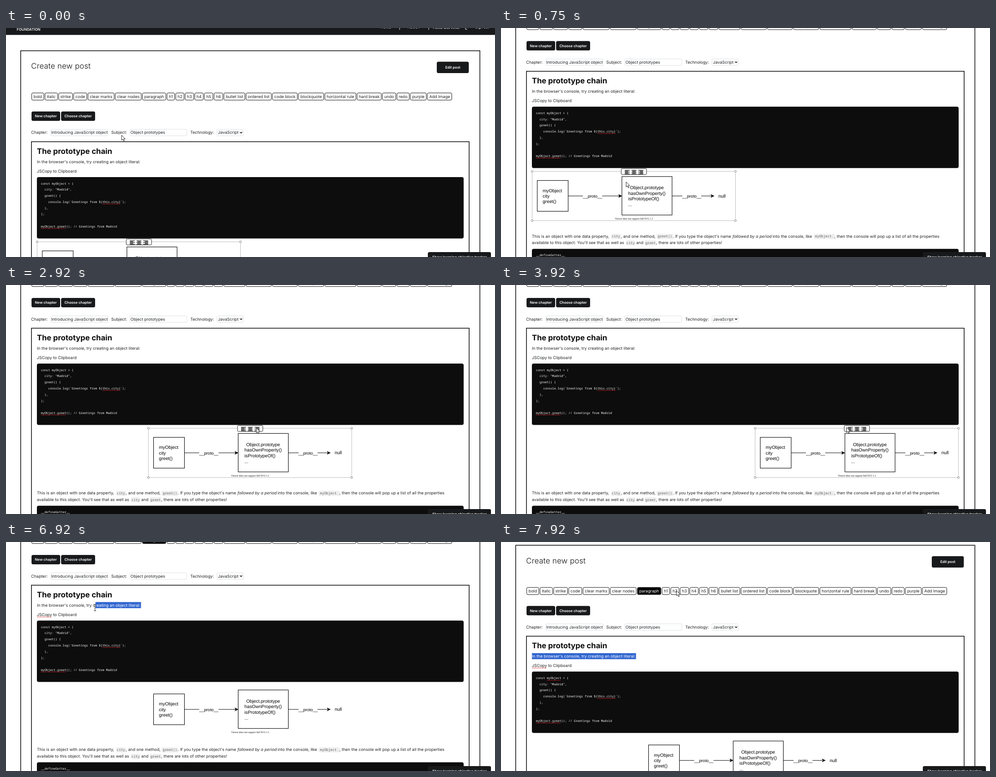
An HTML page that plays this animation: 1092 px wide and 513 px high, repeating every 8 s.

```html
<!DOCTYPE html>
<html lang="en">
<head>
<meta charset="utf-8">
<title>Post editor</title>
<style>
html, body { margin: 0; width: 100%; height: 100%; overflow: hidden; background: #fff; }
svg { display: block; width: 1092px; height: 513px; }
text { font: 9.1px Inter, sans-serif; fill: #212326; white-space: pre; text-rendering: geometricPrecision; }
.title { font-size: 17.06px; font-weight: 300; letter-spacing: .22px; fill: #111; }
.heading { font-size: 17.06px; font-weight: 700; fill: #0d0d0d; }
.strong { font-size: 7.96px; font-weight: 600; fill: #fff; }
.nav { fill: #fff; }
.small { font-size: 7.96px; fill: #fff; }
.code { font: 500 6.74px "Noto Sans Mono", monospace; fill: #fff; }
.inline { font: 7.66px "Noto Sans Mono", monospace; fill: #616161; }
.italic { font-style: italic; }
.figure { font: 10.3px "Liberation Sans", Arial, sans-serif; fill: #000; }
.proto { font: 9.5px "Liberation Sans", Arial, sans-serif; fill: #000; }
.caption { font: 5.65px "Liberation Serif", Times, serif; fill: #000; }
.mid { text-anchor: middle; }
.white { fill: #fff; }
.ink { fill: none; stroke: #000; }
</style>
</head>
<body>
<svg id="stage" viewBox="0 0 1092 513"></svg>
<script>
const DARK = '#18191b', BLOCK = '#0d0d0d';

const text = (x, y, str, cls = '') => `<text x="${x}" y="${y}" class="${cls}">${str}</text>`;
const box = (x, y, right, bottom, attrs = '') =>
  `<rect x="${x}" y="${y}" width="${right - x}" height="${bottom - y}" ${attrs}/>`;
const path = (d, attrs = 'class="ink"') => `<path d="${d}" ${attrs}/>`;

const darkButton = (x, y, right, bottom, label) =>
  box(x, y, right, bottom, `rx="3.5" fill="${DARK}"`) +
  text((x + right) / 2, (y + bottom) / 2 + 2.9, label, 'strong mid');

function squiggle(x, right, y, id = '') {
  let d = `M${x} ${y}`;
  for (let i = 1; x + i * 1.2 <= right; i++) d += `L${x + i * 1.2} ${y + (i % 2 ? 1.3 : 0)}`;
  return path(d, `id="${id}" fill="none" stroke="#e5242c" stroke-width=".8"`);
}

function navBar() {
  return box(0, -30, 1092, 15.5, `fill="${DARK}"`) +
    text(24, 6, 'FOUNDATION', 'strong') +
    text(836, 1, 'HOME', 'small') + text(897, 1, 'ABOUT', 'small') +
    text(953, 2, 'Hello Dorvino!', 'nav') + text(1048, 1, 'Sign out', 'small') +
    path('M879 -4V4M944 -4V4M1029 -4H1026V3H1030M1031 -1H1036', 'fill="none" stroke="#fff"');
}

function toolbar() {
  const buttons = [['bold', 84.5], ['italic', 115], ['strike', 148.5], ['code', 180.5],
    ['clear marks', 241.5], ['clear nodes', 302], ['paragraph', 357], ['h1', 376.5], ['h2', 397.5],
    ['h3', 419], ['h4', 440.5], ['h5', 462], ['h6', 484], ['bullet list', 533.5],
    ['ordered list', 592.5], ['code block', 650.5], ['blockquote', 709.5], ['horizontal rule', 781.5],
    ['hard break', 838], ['undo', 870.5], ['redo', 900.5], ['purple', 938.5], ['Add Image', 995.5]];
  let x = 57.5;
  return buttons.map(([label, right]) => {
    const markup = `<g id="${label.replace(' ', '-')}">` +
      box(x, 145.5, right, 161.5, 'rx="2.5" fill="#fff" stroke="#111"') +
      text((x + right) / 2, 157, label, 'mid') + '</g>';
    x = right + 2.7;
    return markup;
  }).join('');
}

function fields() {
  const border = 'rx="2" fill="#fff" stroke="#d5d9de" stroke-width=".8"';
  return text(56, 237.5, 'Chapter:') + box(100, 227, 228, 241.5, border) +
    text(101, 237.5, 'Introducing JavaScript object') +
    text(235, 237.5, 'Subject:') + box(276.5, 227, 404, 241.5, border) +
    text(278, 237.5, 'Object prototypes') +
    text(411.5, 237.5, 'Technology:') + box(471, 227, 530, 241.5, border) +
    text(473.5, 237.5, 'JavaScript') +
    path('M522.5 233L525 235.6L527.5 233', 'fill="none" stroke="#111" stroke-width="1.4"');
}

function codeBlock() {
  const lines = ['const myObject = {', '  city: "Madrid",', '  greet() {',
    '    console.log(`Greetings from ${this.city}`);', '  },', '};', '',
    'myObject.greet(); // Greetings from Madrid'];
  return box(69, 334, 1022, 471.5, `rx="4" fill="${BLOCK}"`) +
    lines.map((line, i) => text(78, 350.6 + i * 13.78, line, 'code')).join('') +
    squiggle(102, 134, 353, 'objectSquiggle') + squiggle(215, 256, 393.5) + squiggle(78, 134, 448.5);
}

function figure() {
  const head = x => path(`M${x} 533l-8.5 -4l2 4l-2 4z`, '');
  const icon = (x, align) => [0, 1, 2, 3, 4].map(i => {
    const width = i % 2 ? 7.5 : 11;
    return box(x + (11 - width) * align, 475 + i * 2, x + (11 - width) * align + width, 476.2 + i * 2);
  }).join('');
  const handle = (x, y) => `<circle cx="${x}" cy="${y}" r="2.1" fill="#fff" stroke="#777" stroke-width=".9"/>`;
  return box(12, 498.3, 81, 567.3, 'class="ink" stroke-width="1.1"') +
    box(201, 489.5, 313, 575.7, 'class="ink" stroke-width="1.1"') +
    ['myObject', 'city', 'greet()'].map((s, i) => text(24, 524.3 + i * 12.4, s, 'figure')).join('') +
    text(219, 518, 'Object.prototype', 'figure') +
    ['hasOwnProperty()', 'isPrototypeOf()', '...'].map((s, i) =>
      text(215, 530.3 + i * 12.6, s, 'figure')).join('') +
    path('M81 533H114M157 533H195M313 533H336M378 533H400') + head(201.5) + head(407.5) +
    text(135.5, 536.8, '__proto__', 'proto mid') + text(357, 536.8, '__proto__', 'proto mid') +
    text(416.5, 536.4, 'null', 'figure') +
    text(228, 586, 'Viewer does not support full SVG 1.1', 'caption mid') +
    '<g id="selected">' +
    box(0.5, 478, 454.5, 588.3, 'fill="none" stroke="#777" stroke-width=".8" stroke-dasharray="2 1.2"') +
    [0.5, 454.5].map(x => handle(x, 478) + handle(x, 588.3)).join('') +
    box(199.5, 471.6, 256, 485, 'rx="2" fill="#fff" stroke="#222"') +
    icon(207.5, 0) + icon(222.5, .5) + icon(237.5, 1) + '</g>';
}

function closing() {
  const inline = (x, right, y, str) =>
    box(x, y - 8.3, right, y + 3, 'rx="2" fill="#efefef"') + text((x + right) / 2, y - .3, str, 'inline mid');
  return text(69, 626.4, 'This is an object with one data property,') + inline(246, 267.5, 626.4, 'city') +
    text(267.5, 626.4, ', and one method,') + inline(347.5, 384.5, 626.4, 'greet()') +
    text(383.5, 626.4, '. If you type the object\'s name') +
    text(517, 626.4, 'followed by a period', 'italic') + text(606.5, 626.4, 'into the console, like') +
    inline(698.5, 745.5, 626.4, 'myObject.') +
    text(744.5, 626.4, ', then the console will pop up a list of all the properties') +
    text(69, 640.8, 'available to this object. You\'ll see that as well as') + inline(279, 300, 640.8, 'city') +
    text(302, 640.8, 'and') + inline(320.5, 347, 640.8, 'greet') +
    text(346.5, 640.8, ', there are lots of other properties!') +
    box(69, 651.5, 1022, 720, `rx="4" fill="${BLOCK}"`) + text(78, 668, '__defineGetter__', 'code');
}

const sentence = 'In the browser\'s console, try creating an object literal:';

document.getElementById('stage').innerHTML =
  '<clipPath id="selectionClip"><rect id="selection" y="292.6" height="13.6"/></clipPath>' +
  '<g id="page">' + navBar() +
  box(32.8, 51, 1058.3, 900, 'class="ink" stroke-width="1.5"') +
  text(56, 91.3, 'Create new post', 'title') +
  darkButton(962, 75.5, 1033.5, 101, 'Edit post') + toolbar() +
  darkButton(57, 187, 121, 208, 'New chapter') + darkButton(123, 187, 199, 208, 'Choose chapter') +
  fields() +
  box(56.8, 254.7, 1034.3, 900, 'class="ink" stroke-width="1.5"') +
  text(69, 282, 'The prototype chain', 'heading') +
  text(69, 303, sentence) +
  '<g clip-path="url(#selectionClip)">' + box(60, 290, 310, 310, 'fill="#3166d0"') +
  text(69, 303, sentence, 'white') + '</g>' +
  text(69, 323.8, 'JSCopy to Clipboard') + squiggle(69, 102, 325.5, 'copySquiggle') +
  box(160.3, 314.3, 161.2, 326.5, 'id="caret"') +
  codeBlock() + `<g id="figure">${figure()}</g><g id="closing">${closing()}</g></g>` +
  box(942, 502, 1083, 530, `rx="3.5" fill="${DARK}"`) +
  text(1012.8, 516, 'Show learning objective tracker', 'strong mid') +
  '<g id="pointer">' +
  path('M0 0V11.4L2.7 9L4.7 13.4L6.5 12.6L4.6 8.3H8.2Z',
    'id="arrow" fill="#fff" stroke="#111" stroke-width=".9" stroke-linejoin="round"') +
  path('M-2.5 -7H2.5M0 -7V7M-2.5 7H2.5', 'id="beam" fill="none" stroke="#111" stroke-width=".9"') + '</g>';

const el = id => document.getElementById(id);
const smooth = p => p * p * (3 - 2 * p);

// Keys are rows of [time, value, value...]; values ease between rows.
function track(keys, t, ease = smooth) {
  const next = keys.findIndex(key => key[0] > t);
  if (next < 0) return keys[keys.length - 1].slice(1);
  const from = keys[next - 1], to = keys[next];
  const p = ease((t - from[0]) / (to[0] - from[0]));
  return from.slice(1).map((v, i) => v + (to[i + 1] - v) * p);
}

const scrollKeys = [[0, 0], [170, 44], [240, 44], [460, 101], [530, 101], [760, 158],
  [7498, 158], [7700, 101], [7705, 101], [7910, 43.7]];
const pointerKeys = [[0, 258, 240], [500, 269, 368], [920, 285, 332], [1170, 295, 318], [1300, 296, 318],
  [1580, 329, 340], [1700, 329, 340], [1920, 575, 328], [2170, 579, 326], [2350, 579, 326],
  [2750, 559, 320], [2980, 559, 320], [3330, 775, 345], [3550, 775, 345], [3920, 771.5, 319],
  [4250, 793, 319], [4520, 793, 319], [5000, 198, 164], [6000, 198, 164], [6280, 297, 127],
  [6400, 297, 141], [6750, 211, 144], [7000, 195, 148], [7170, 191, 148], [7300, 191, 142],
  [7570, 321, 133], [7910, 392, 109]];
const selectionKeys = [[0, 301.5], [6400, 301.5], [6750, 215], [7000, 195], [7160, 195], [7170, 191], [8000, 191]];

const show = (id, visible) => el(id).setAttribute('visibility', visible ? 'visible' : 'hidden');
const move = (id, x, y) => el(id).setAttribute('transform', `translate(${x} ${y})`);
const within = (t, from, to) => t >= from && t < to;

function draw(t) {
  move('page', 0, -track(scrollKeys, t)[0]);
  move('pointer', ...track(pointerKeys, t));

  const selected = t < 1250 || within(t, 2330, 3000) || within(t, 3500, 4500);
  const left = t < 1250 ? 69 : within(t, 3000, 4500) ? 567 : 317.5;
  move('figure', left, selected ? 1 : 0);
  move('closing', 0, selected ? 1 : 0);
  show('selected', selected);

  const editing = t >= 4750;
  const paragraph = el('paragraph');
  paragraph.firstChild.setAttribute('fill', editing ? '#000' : '#fff');
  paragraph.lastChild.setAttribute('class', editing ? 'mid white' : 'mid');
  show('caret', within(t, 4750, 5250) || within(t, 5750, 6250));
  show('copySquiggle', t >= 5830);
  show('objectSquiggle', t >= 7330);

  const selectionStart = t >= 7330 ? 69 : track(selectionKeys, t)[0];
  el('selection').setAttribute('x', selectionStart);
  el('selection').setAttribute('width', 301.5 - selectionStart);

  const overText = within(t, 4950, 5500) || within(t, 6200, 7330);
  show('beam', overText);
  show('arrow', !overText);
}

function frame() {
  draw(performance.now() % 8000);
  requestAnimationFrame(frame);
}
frame();
</script>
</body>
</html>
```
